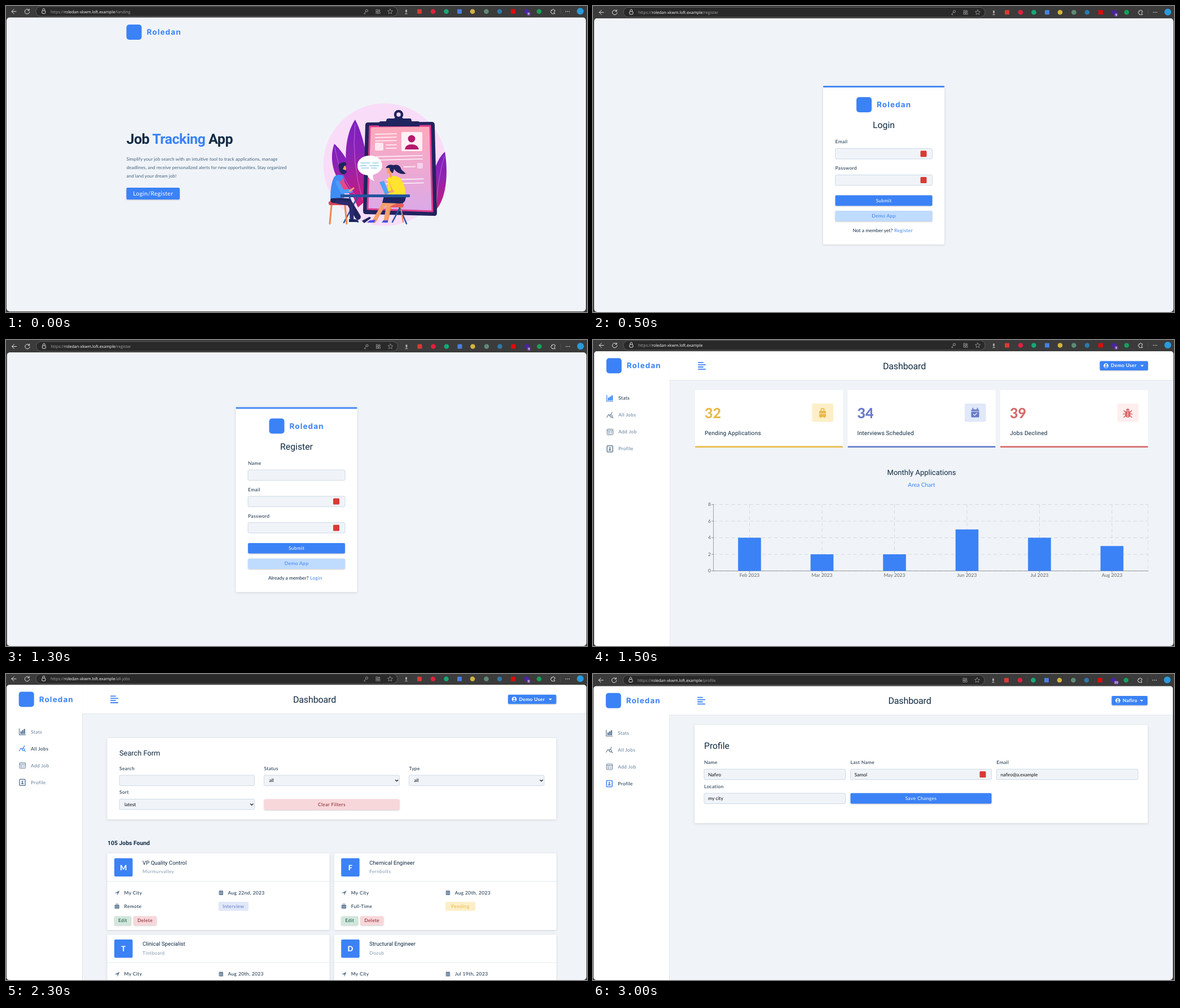
Animation, 1030 px wide and 544 px high, one loop 3500 ms. Source, as an HTML page:

```html
<!DOCTYPE html>
<html lang="en">
<head>
<meta charset="utf-8">
<title>Job tracker tour</title>
<style>
  html, body { margin: 0; width: 100%; height: 100%; overflow: hidden; background: #3b3b3b; }
  svg { display: block; width: 100vw; height: 100vh; }
  text { font: 8.5px Lato, sans-serif; fill: #102a43; text-rendering: geometricPrecision; white-space: pre; }
  .label { letter-spacing: .35px; }
  .mid { text-anchor: middle; }
  .head { font-family: Roboto, sans-serif; }
  .url { font: 7.1px "Open Sans", sans-serif; fill: #a5a5a5; }
  .brand { font: 700 13.5px Inter, sans-serif; letter-spacing: 1.1px; fill: #3b82f6; }
  .card { fill: #fff; filter: drop-shadow(0 1.5px 2px rgba(0, 0, 0, .13)); }
  .button { filter: drop-shadow(0 1px 1.2px rgba(0, 0, 0, .2)); }
</style>
</head>
<body>
<svg id="stage" viewBox="0 0 1030 544"></svg>
<script>
const BLUE = '#3b82f6', INK = '#102a43', SLATE = '#627d98', PAPER = '#f0f4f8', RED = '#d93a36';
const HOST = 'roledan-xkwm.loft.example';

// Basic shapes. Text is placed by the centre of its capital letters.
const text = (x, y, s, cls = '', style = '') =>
  `<text x="${x}" y="${y}" dy=".35em" class="${cls}" style="${style}">${s}</text>`;
const heading = (x, y, s, size, cls = '', style = '') =>
  text(x, y, s, 'head ' + cls, `font-size:${size}px;${style}`);
const rect = (x, y, w, h, fill, rx = 0, extra = '') =>
  `<rect x="${x}" y="${y}" width="${w}" height="${h}" fill="${fill}" rx="${rx}" ${extra}/>`;
const circle = (x, y, r, fill, extra = '') => `<circle cx="${x}" cy="${y}" r="${r}" fill="${fill}" ${extra}/>`;
const path = (d, fill, extra = '') => `<path d="${d}" fill="${fill}" ${extra}/>`;
const line = (d, color, width = 1, extra = '') =>
  path(d, 'none', `stroke="${color}" stroke-width="${width}" stroke-linecap="round" stroke-linejoin="round" ${extra}`);
const at = (x, y, s) => `<g transform="translate(${x} ${y})">${s}</g>`;
const card = (x, y, w, h) => rect(x, y, w, h, '#fff', 2, 'class="card"');
const button = (x, y, w, h, s, fill = BLUE, color = '#fff', style = '') =>
  rect(x, y, w, h, fill, 2, 'class="button"') +
  text(x + w / 2, y + h / 2 - .3, s, 'label mid', `fill:${color};${style}`);
const logo = (x, y) => rect(x, y, 27, 27, BLUE, 5) + text(x + 36, y + 13.5, 'Roledan', 'brand');
const marker = (x, y) => rect(x - 5.5, y - 5.5, 11, 11, RED, 1.5);

function field(x, y, w, label, value = '', kind = '') {
  const top = y + 12;
  return text(x, y, label, 'label') +
    rect(x, top, w, 18.5, PAPER, 2, 'stroke="#bcccdc" stroke-width=".7"') +
    text(x + (kind === 'select' ? 9 : 7), top + 9.5, value, '', 'fill:#111') +
    (kind === 'select' ? line(`M${x + w - 7} ${top + 8.5}l2.2 2.2 2.2-2.2`, '#111', 1.2) : '') +
    (kind === 'marked' ? marker(x + w - 15.5, top + 9.3) : '');
}

// Browser frame, relative to the page corner
function toolbar(route, badge, hasKey) {
  const gray = '#9b9b9b', white = '#e2e2e2';
  const blobs = [[732, RED], [756, '#e0203f', 1], [779.5, '#15a878', 1], [803, '#4a7fe0'], [826, '#d3b43c', 1],
    [850.5, '#5f8a76', 1], [874, '#2e78a8', 1], [898, '#e00b0b'], [922, '#4b22a8', 1], [944, '#16a05a', 1]];
  const icons = blobs.map(([x, color, round]) =>
    round ? circle(x, 0, 4.3, color) : rect(x - 4, -4, 8, 8, color, 1)).join('');
  return at(0, -10.5,
    line('M17 0H9m4-4L9 0l4 4', white) +
    line('M39.5-2.8A4.2 4.2 0 1 0 40.7 .5M40.2-4.5v2.5h-2.5', white) +
    rect(52, -8.8, 641, 17.3, '#292929', 8.6, 'stroke="#666" stroke-width=".8"') +
    rect(62.8, -1.5, 6, 5, 'none', 1, `stroke="${white}"`) + line('M64-2v-1.5a1.8 1.8 0 0 1 3.6 0V-2', white, .9) +
    text(78, .3, `https://<tspan fill="#fff">${HOST}</tspan>${route}`, 'url') +
    (hasKey ? circle(638.5, -1.5, 2, 'none', `stroke="${gray}"`) + line('M637 0l-3 3v1h2', gray) : '') +
    [[655, -3.5], [655, .5], [659, .5]].map(([x, y]) => rect(x, y, 3, 3, 'none', 0, `stroke="${gray}" stroke-width=".8"`)).join('') +
    line('M660.5-4v4m-2-2h4', gray, .8) +
    line('M680-4.5l1.3 2.9 3.2.3-2.4 2.1.7 3.2-2.8-1.7-2.8 1.7.7-3.2-2.4-2.1 3.2-.3z', gray, .8) +
    rect(707, -3.5, 3, 5, '#aaa', 1.5) + line('M708.5 2v2m-2 0h4', '#aaa') +
    icons + rect(922.5, 1, badge > 9 ? 8 : 6, 6.5, '#6b3fa5', 1.5) +
    text(badge > 9 ? 926.5 : 925.5, 4.3, badge, 'mid', 'font-size:5.5px;font-weight:700;fill:#fff') +
    line('M966-2.5h1.5a1.5 1.5 0 0 1 3 0H972v2.2a1.5 1.5 0 0 0 0 3V4h-5.5V2.5a1.5 1.5 0 0 1 0-4z', white, .9) +
    line('M982-4v8', '#5a5a5a', .7) +
    [-3, 0, 3].map(d => circle(994.5 + d, 0, .8, white)).join('') +
    circle(1017, -.5, 6, '#299bdd'));
}

function illustration() {
  const navy = '#20245f', skin = '#f7a06b', soft = 'stroke-opacity=".75"';
  const rules = [[655, 228, 37], [655, 234, 37], [655, 240, 37], [674, 247, 18], [674, 253, 18],
    [657, 268, 81], [657, 274, 81], [705, 286, 20], [674, 309, 66], [674, 316, 66]];
  return circle(671.5, 282, 109, '#f9ddf8') +
    path('M582 245C572 272 578 315 626 348C632 315 602 263 582 245Z', 'url(#leaf)') +
    path('M619 202C598 232 594 298 624 358L645 340C646 285 634 230 619 202Z', 'url(#leaf)') +
    path('M778 259C754 282 752 325 758 366C780 349 785 300 778 259Z', 'url(#leaf)') +
    line('M619 210Q612 275 632 345M583 252Q592 305 622 340M777 267Q765 310 763 353', '#e58be8', .6) +
    path('M642 207L755 206Q760 206 760 212L764 368Q764 374 758 373L638 370Q633 370 633 364L637 212Q637 207 642 207Z', navy) +
    path('M645 214L752 213L756 365L641 361Z', 'url(#sheet)', 'stroke="#e13b8d" stroke-width="3" stroke-linejoin="round"') +
    circle(696, 193, 6, 'none', `stroke="${navy}" stroke-width="4.5"`) +
    path('M690 198h12l2 2h12q3 0 3 5h12q2 0 2 3v6H661v-5q0-4 4-4h9q0-5 4-5h10Z', navy) +
    rules.map(([x, y, w]) => line(`M${x} ${y}l${w} ${-w / 40}`, '#fff', 1.8, soft)).join('') +
    rect(654, 243, 15, 14, '#ffe6ef', 2) + rect(729, 279, 10, 10, '#f3d3f0', 2) +
    rect(701, 224, 37, 34, '#fff0f5', 2) + circle(719, 236, 6.5, '#b5196d') +
    path('M707 255q1-9 12-9t13 9z', '#b5196d') +
    // table legs and stools
    line('M623 340L599 385M609 340L624 384M708 340L685 384M690 340L710 387', '#2455a4', 2.5) +
    line('M577 354L574 387M601 354L604 387', '#ee8750', 3) + rect(572, 347, 34, 7, '#d94358', 3) +
    rect(677, 351, 28, 7, '#e55b59', 3) + line('M682 358L676 384M700 358L704 384', '#ee8750', 2) +
    // seated man
    line('M580 345L607 347L624 375', navy, 10) + line('M588 348L612 352L613 379', '#2b2a6d', 7) +
    path('M608 379h11q5 2 5 5h-16zM631 382l13-7q4 0 2 3l-11 8z', navy) +
    path('M581 305Q586 298 597 301Q603 315 599 341L575 342Q575 318 581 305Z', '#3f8cf5') +
    path('M596 306L608 326L605 334Q594 330 591 315Z', '#e44a88') + line('M588 314L596 330L611 329', '#4f9cff', 7) +
    line('M609 329l7-5', skin, 3) + circle(597, 289, 6, skin) +
    path('M590 287Q588 279 595 279Q602 275 604 282L600 284L597 290L604 293Q603 300 596 299Q591 296 590 287Z', navy) +
    // seated woman
    line('M688 346L670 352L653 382M690 348L678 354L673 382', skin, 7) +
    path('M645 381l10-1-2 5h-13zM669 381l8 0v4h-11z', '#4d50dd') +
    path('M670 338H708Q710 350 699 351L667 350Z', navy) +
    path('M677 306Q686 298 699 306Q709 320 708 336L677 337Z', '#ffe32e') +
    line('M681 313L686 329L672 333', skin, 4) + line('M682 310L688 324', '#ffe32e', 7) +
    circle(681, 293, 6, skin) + line('M682 298v5', skin, 4) +
    path('M673 288Q677 280 687 283Q698 280 701 291L709 298Q696 301 688 290L686 297Q680 295 680 288Z', navy) +
    path('M662 313l8-2 9 22-7 2z', '#4da4fa') + rect(593, 335, 123, 5, '#2554a0', 1) +
    // speech bubble
    path('M645 266C659 266 667 274 667 284C667 292 659 298 651 300Q649 304 653 311Q642 308 641 301C629 300 623 293 623 284C623 273 632 266 645 266Z', '#fff') +
    line('M629 279h16M650 279h10M628 284h11M645 284h16M630 288h13M648 288h9', '#5cb5df', 1.2);
}

const landing = () => logo(213.5, 33) +
  heading(213.5, 236.5, `Job <tspan fill="${BLUE}">Tracking</tspan> App`, 25, '', 'font-weight:700;letter-spacing:-.5px') +
  ['Simplify your job search with an intuitive tool to track applications, manage',
    'deadlines, and receive personalized alerts for new opportunities. Stay organized',
    'and land your dream job!'].map((s, i) => text(213.5, 272.3 + 15 * i, s, '', 'font-size:8.2px;fill:#486581')).join('') +
  button(213.5, 323, 94.5, 21, 'Login/Register', BLUE, '#fff', 'font-size:10.4px') + illustration();

function authForm(x, y, title, labels, question, link, [questionX, linkX]) {
  const left = x + 21.5, mid = x + 107.5, fieldY = i => y + 99.5 + 46.8 * i;
  const last = fieldY(labels.length - 1);
  return card(x, y, 215, last + 135.5 - y) + rect(x, y, 215, 2.8, BLUE, 1) + logo(x + 59, y + 20) +
    heading(mid, y + 69.5, title, 15.8, 'mid') +
    labels.map((s, i) => field(left, fieldY(i), 172, s, '', s === 'Name' ? '' : 'marked')).join('') +
    button(left, last + 48.3, 172, 18.7, 'Submit') +
    button(left, last + 75.8, 172, 18.7, 'Demo App', '#bfdbfe', BLUE) +
    text(x + questionX, last + 110.5, question) + text(x + linkX, last + 110.5, link, 'label', `fill:${BLUE}`);
}

// Sidebar and header, relative to the page corner
function dashboard(active, titleX, buttonRight, user) {
  const icons = [
    c => line('M-5.5-5.5v11h11', c, 1.2) + [[-3.5, 5], [-.5, 7], [2.5, 9]].map(([x, h]) => rect(x, 4 - h, 2.5, h, c)).join(''),
    c => line('M-5.5 4l3-5 2.5 2 4-6', c, 1.2) + circle(2, 1.5, 2, 'none', `stroke="${c}" stroke-width="1.1"`) + line('M3.5 3l2 2', c, 1.2),
    c => rect(-5, -5, 10.5, 10, 'none', 1, `stroke="${c}"`) + line('M-5-2.5h10M-3 0h3M-3 2.5h3M2 0h1.5M2 2.5h1.5', c),
    c => rect(-5, -5.5, 10, 11, 'none', 1, `stroke="${c}" stroke-width="1.5"`) + circle(0, -1.5, 1.5, c) + path('M-2.5 3q0-2.5 2.5-2.5t2.5 2.5z', c)
  ];
  const width = user.length > 6 ? 85.5 : 63.5, left = buttonRight - width;
  return rect(0, 0, 134.5, 530, '#fff') + rect(134.5, 0, 900, 51.5, '#fff') +
    line('M134.5 530V51.5H1030', '#d5dee8', .7) + logo(21.7, 12.2) +
    line('M184.8 20.2h8.2M184.8 24.1h12.4M184.8 28h8.2M184.8 31.8h12.4', BLUE, 1.8) +
    heading(titleX, 26, 'Dashboard', 16, 'mid', 'letter-spacing:-.15px') +
    ['Stats', 'All Jobs', 'Add Job', 'Profile'].map((s, i) => {
      const y = 83.5 + 30 * i, on = i === active;
      return at(28, y, icons[i](on ? BLUE : SLATE)) + text(43, y, s, 'label', `fill:${on ? INK : SLATE}`);
    }).join('') +
    rect(left, 17.5, width, 16.5, BLUE, 2, 'class="button"') +
    circle(left + 11, 25.7, 4.3, '#fff') + circle(left + 11, 24.3, 1.5, BLUE) +
    path(`M${left + 8.2} 28q2.8-2.8 5.6 0q-2.8 2.5-5.6 0z`, BLUE) +
    text(left + 19.5, 25.5, user, 'label', 'fill:#fff;font-weight:700') +
    path(`M${buttonRight - 13.5} 24.5h6l-3 3z`, '#fff');
}

function stats() {
  const icons = [
    c => rect(-6, -3.5, 12, 11, c, 1.5) + line('M-2.5-4v-3.5h5V-4', c, 1.7) + line('M-6 1.5H6', '#fcefc7', 1.2) + rect(-4, 7, 2, 2, c) + rect(2, 7, 2, 2, c),
    c => rect(-7, -6, 14, 14, c, 1.5) + line('M-4-6v-2M4-6v-2', c, 2) + line('M-7-2.5H7', '#e0e8f9') + line('M-3 2.5l2 2 4-4', '#e0e8f9', 1.5),
    c => path('M-3-4a3 3.5 0 0 1 6 0zM-4.5-3h9v7a4.5 4.5 0 0 1-9 0z', c) + line('M-4-1L-7-4M4-1L7-4M-4 2h-4M4 2h4M-4 5L-7 8M4 5L7 8', c, 1.6) + line('M0-1v9', '#ffeeee')
  ];
  const tiles = [[32, 'Pending Applications', '#e9b949', '#fcefc7'], [34, 'Interviews Scheduled', '#647acb', '#e0e8f9'], [39, 'Jobs Declined', '#d66a6a', '#ffeeee']];
  const months = { 'Feb 2023': 4, 'Mar 2023': 2, 'May 2023': 2, 'Jun 2023': 5, 'Jul 2023': 4, 'Aug 2023': 3 };
  const dash = 'stroke-dasharray="5.4 5.4"', grid = '#cfd2d6', axis = '#777', base = 410.5, unit = 14.75;
  const barX = i => 277.5 + 128.5 * i;
  const entries = Object.entries(months);
  return tiles.map(([n, s, color, tint], i) => {
    const x = 181 + 270.5 * i;
    return rect(x, 89, 262, 102, '#fff', 2) + rect(x, 188.5, 262, 2.7, color, 1) +
      text(x + 17, 130, n, '', `font-size:25px;font-weight:800;fill:${color}`) +
      heading(x + 17, 165, s, 10.3, '', 'letter-spacing:.15px') +
      rect(x + 207.5, 113, 37.5, 32.5, tint, 2) + at(x + 226, 129.5, icons[i](color));
  }).join('') +
    heading(582.5, 235, 'Monthly Applications', 13, 'mid') +
    text(582.5, 257.5, 'Area Chart', 'mid', `font-size:10.2px;fill:${BLUE}`) +
    [0, 2, 4, 6, 8].map(v => {
      const y = base - unit * v;
      return line(`M213.5 ${y}H984`, grid, .8, dash) + line(`M210.5 ${y}h3`, axis, .7) +
        text(209, y, v, '', 'fill:#666;text-anchor:end');
    }).join('') +
    entries.map((_, i) => line(`M${barX(i)} 292.5V${base}`, grid, .8, dash)).join('') +
    line(`M984 292.5V${base}`, grid, .6, dash) +
    line(`M213.5 292.5V${base}H984`, axis, .7) +
    entries.map(([month, v], i) => rect(barX(i) - 20.3, base - unit * v, 40.6, unit * v, BLUE) +
      line(`M${barX(i)} ${base}v3`, axis, .7) + text(barX(i), 418.3, month, 'mid', 'fill:#666')).join('');
}

function jobCard(x, y, title, company, date, type, status) {
  const pale = '#829ab1', tile = x + 12.5;
  const [tint, color] = status === 'Pending' ? ['#fcefc7', '#e9b949'] : ['#e0e8f9', '#647acb'];
  return card(x, y, 394, 136) + rect(tile, y + 8.5, 32.5, 32.5, BLUE, 2) +
    text(x + 28.7, y + 25, company[0], 'mid', 'font-size:13px;font-weight:800;fill:#fff') +
    heading(x + 62.5, y + 16.5, title, 9.7) + text(x + 62.5, y + 32.5, company, 'label', `fill:${pale}`) +
    line(`M${x} ${y + 49.5}h394`, '#d9e2ec', .7) +
    path(`M${x + 13} ${y + 70.5}l9-4.5-4 9v-4.5z`, SLATE) + text(x + 30, y + 70, 'My City', 'label') +
    rect(x + 198, y + 66.5, 7.5, 7.5, SLATE, 1) +
    line(`M${x + 200} ${y + 66}v-.8m3.5 .8v-.8`, SLATE) +
    line(`M${x + 199} ${y + 69.5}h5.5m-5.5 2h5.5`, '#fff', .6, 'stroke-dasharray="1 1.2"') +
    text(x + 214, y + 70, date, 'label') +
    rect(x + 13, y + 91.5, 8.5, 6.5, SLATE, 1) + line(`M${x + 15.5} ${y + 91}v-1.2h3.5v1.2`, SLATE, .9) +
    line(`M${x + 13} ${y + 95}h8.5`, '#fff', .6) + text(x + 30, y + 94, type, 'label') +
    rect(x + 197, y + 86, 53.5, 16, tint, 2) + text(x + 223.7, y + 93.7, status, 'label mid', `fill:${color}`) +
    button(tile, y + 111.5, 30, 16, 'Edit', '#d1e7dd', '#0f5132') +
    button(x + 46.5, y + 111.5, 41, 16, 'Delete', '#f8d7da', '#842029');
}

const allJobs = () => card(179.5, 114, 796, 144.5) + heading(201, 140.5, 'Search Form', 12.8) +
  field(201, 168, 239.5, 'Search') + field(457.5, 168, 240, 'Status', 'all', 'select') +
  field(714.5, 168, 239.5, 'Type', 'all', 'select') + field(201, 210.5, 239.5, 'Sort', 'latest', 'select') +
  button(457.5, 222.5, 240, 19, 'Clear Filters', '#f8d7da', '#842029') +
  heading(180, 300.5, '105 Jobs Found', 10.4, '', 'font-weight:700') +
  jobCard(179.5, 319, 'VP Quality Control', 'Murmurvalley', 'Aug 22nd, 2023', 'Remote', 'Interview') +
  jobCard(581.7, 319, 'Chemical Engineer', 'Fernbolts', 'Aug 20th, 2023', 'Full-Time', 'Pending') +
  jobCard(179.5, 463.5, 'Clinical Specialist', 'Tintboard', 'Aug 20th, 2023', 'Remote', 'Pending') +
  jobCard(581.7, 463.5, 'Structural Engineer', 'Dozub', 'Jul 19th, 2023', 'Remote', 'Pending');

const addJob = () => card(179, 89, 803, 174.5) + heading(196, 125.7, 'Add Job', 15.7) +
  field(196, 155.5, 250.5, 'Position') + field(455.5, 155.5, 250, 'Company') +
  field(714.5, 155.5, 250.5, 'Job Location', 'my city') +
  field(196, 198.2, 250.5, 'Status', 'pending', 'select') + field(455.5, 198.2, 250, 'Job Type', 'full-time', 'select') +
  button(714.5, 210, 121, 19, 'Clear', SLATE) + button(844, 210, 121, 19, 'Submit');

const profile = () => card(180, 90.5, 803.5, 174.5) + heading(197, 127.2, 'Profile', 15.7) +
  field(197, 157.2, 250.5, 'Name', 'Nafiro') + field(456.5, 157.2, 250, 'Last Name', 'Samol', 'marked') +
  field(715.5, 157.2, 250.5, 'Email', 'nafiro@a.example') + field(197, 200, 250.5, 'Location', 'my city') +
  button(456.5, 211.8, 250, 18.7, 'Save Changes');

// Each screen: page edges, address path, content, optional dashboard frame
const screens = [
  { x: 1, y: 20.3, right: 1028, bottom: 543, route: '/landing', body: landing() },
  { x: 2, y: 21.8, route: '/register', body: authForm(408, 142, 'Login', ['Email', 'Password'], 'Not a member yet?', 'Register', [52.5, 126]) },
  { x: 1.5, y: 22, route: '/register', body: authForm(407.5, 119.5, 'Register', ['Name', 'Email', 'Password'], 'Already a member?', 'Login', [57.5, 131.5]) },
  { x: 2, y: 20, route: '', body: stats(), frame: dashboard(0, 550, 982, 'Demo User') },
  { x: 1, y: 19.2, route: '/all-jobs', body: allJobs(), frame: dashboard(1, 546, 974.5, 'Demo User') },
  { x: 0, y: 20, route: '/add-job', body: addJob(), frame: dashboard(2, 549.5, 982, 'Demo User') },
  { x: 1, y: 21.5, right: 1028, route: '/profile', body: profile(), frame: dashboard(3, 560.5, 982, 'Nafiro'), badge: 10 }
];

function renderScreen({ x, y, right = 1029, bottom = 544, route, body, frame = '', badge = 9 }, i) {
  const page = rect(0, 0, right - x, bottom - y, PAPER, 5);
  return `<g class="screen"><clipPath id="page${i}">${page}</clipPath>${at(x, y, toolbar(route, badge, badge === 9) +
    `<g clip-path="url(#page${i})">${page + frame + at(-x, -y, body)}</g>`)}</g>`;
}

const stage = document.getElementById('stage');
stage.innerHTML = `<defs>
  <linearGradient id="leaf" x2="0" y2="1"><stop stop-color="#7b1fc0"/><stop offset=".4" stop-color="#8d22b4"/><stop offset="1" stop-color="#cc1b78"/></linearGradient>
  <linearGradient id="sheet" x2="0" y2="1"><stop stop-color="#ffa9bb"/><stop offset="1" stop-color="#dba9e8"/></linearGradient>
</defs>` + screens.map(renderScreen).join('');

const groups = [...stage.querySelectorAll('.screen')];
const start = performance.now();
function draw() {
  const current = Math.floor((performance.now() - start) / 500) % groups.length;
  // Hidden by visibility so that each clip path stays available
  groups.forEach((g, i) => { g.style.visibility = i === current ? 'visible' : 'hidden'; });
  requestAnimationFrame(draw);
}
draw();
</script>
</body>
</html>
```
